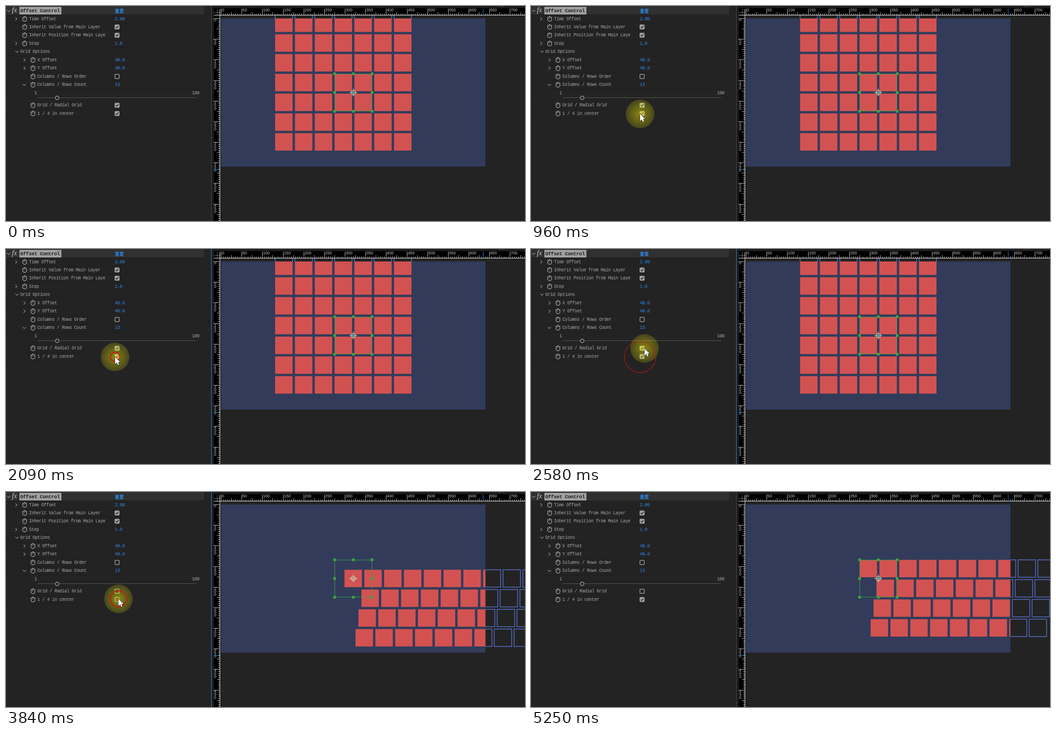
Write an HTML page with a canvas that moves like this. It is 1161 px wide and 482 px high and loops after 5.35 s.

```html
<!DOCTYPE html>
<html lang="en">
<head>
<meta charset="utf-8">
<title>Offset Control</title>
<style>
html, body { margin: 0; width: 100%; height: 100%; overflow: hidden; background: #232323; }
canvas { display: block; }
</style>
</head>
<body>
<canvas id="stage" width="1161" height="482"></canvas>
<script>
const ctx = document.getElementById('stage').getContext('2d');
const LOOP = 5350, UNIT = 0.9235, PITCH = 48 * UNIT, TILE = 39;
const COMP = { x: 481, y: 28, w: 591.5, h: 332 };
const CENTER = { x: 776.7, y: 193.8 };
const MONO = '"Liberation Mono", monospace';
const GRAY = '#a8a8a8', BLUE = '#2d8ceb';

// [time, x, y] of the pointer tip
const POINTER = [
  [640, 170, 515], [800, 212, 345], [930, 244, 242], [2430, 244, 242], [2570, 254, 223],
  [3410, 254, 223], [3480, 251.5, 239.5], [4610, 251.5, 239.5], [4680, 286, 228], [5030, 566, 115]
];
const CLICKS = [[1070, 244, 242], [1880, 244, 242], [2720, 254, 223], [3480, 251.5, 239.5], [4260, 251.5, 239.5]];

function rect(x, y, w, h, color) {
  ctx.fillStyle = color;
  ctx.fillRect(x, y, w, h);
}

function path(points, color, width = 1, closed = false) {
  ctx.beginPath();
  points.forEach(([x, y]) => ctx.lineTo(x, y));
  if (closed) ctx.closePath();
  ctx.strokeStyle = color;
  ctx.lineWidth = width;
  ctx.stroke();
}

function circle(x, y, r, color, width = 1) {
  ctx.beginPath();
  ctx.arc(x, y, r, 0, 7);
  ctx.strokeStyle = color;
  ctx.lineWidth = width;
  ctx.stroke();
}

function text(str, x, y, color = GRAY, font = `10px ${MONO}`, spacing = -0.5) {
  ctx.font = font;
  ctx.letterSpacing = spacing + 'px';
  ctx.fillStyle = color;
  ctx.fillText(str, x, y);
}

function chevron(x, y, open) {
  path(open ? [[x - 3.5, y - 1.5], [x, y + 2], [x + 3.5, y - 1.5]]
            : [[x - 1.5, y - 3.5], [x + 2, y], [x - 1.5, y + 3.5]], '#909090', 1.2);
}

function stopwatch(x, y) {
  circle(x, y + 0.7, 4.6, '#b4b4b4', 1.3);
  path([[x - 2, y - 5.5], [x + 2, y - 5.5]], GRAY, 1.3);
  path([[x, y + 0.7], [x - 2, y - 1.8]], GRAY);
  path([[x - 5, y - 3], [x - 3.5, y - 4.5]], GRAY, 1.2);
  path([[x + 3.5, y - 4.5], [x + 5, y - 3]], GRAY, 1.2);
}

function checkbox(y, on) {
  ctx.beginPath();
  ctx.roundRect(243.7, y - 4.8, 9.6, 9.6, 1.5);
  ctx.strokeStyle = ctx.fillStyle = '#a0a0a0';
  ctx.lineWidth = 1.5;
  ctx.stroke();
  if (!on) return;
  ctx.fill();
  path([[245.5, y], [247.8, y + 2.4], [251.8, y - 2.6]], '#222', 1.6);
}

function row(label, y, level, value, arrow) {
  const x = level * 18.5;
  rect(0, Math.round(y + 9), 443, 1, '#1e1e1e');
  if (arrow) chevron(x + 4, y, arrow === 'open');
  stopwatch(x + 23.3, y);
  text(label, x + 33, y);
  if (typeof value === 'boolean') checkbox(y, value);
  else text(value, 243.5, y, BLUE);
}

function panel(radial, quarter, focused) {
  rect(0, 0, 443, 19, '#303030');
  rect(0, 19, 443, 1, '#1e1e1e');
  chevron(6, 10.5, true);
  text('fx', 13, 10, '#c8c8c8', 'italic 16px "Liberation Serif", serif', 0);
  rect(30, 2, 94, 17, '#a0a0a0');
  text('Offset Control', 32, 11.5, '#1c1c1c', `bold 11px ${MONO}`, -0.3);
  text('重置', 243.5, 11, BLUE, 'bold 10px "Noto Sans CJK SC", sans-serif', 0);
  row('Time Offset', 29, 1, '2.00', 'closed');
  row('Inherit Value from Main Layer', 47, 1, true);
  row('Inherit Position from Main Laye', 65.5, 1, true);
  row('Step', 84, 1, '1.0', 'closed');
  chevron(24.5, 102, true);
  text('Grid Options', 32, 102.5);
  rect(0, 111, 443, 1, '#1e1e1e');
  row('X Offset', 121, 2, '48.0', 'closed');
  row('Y Offset', 139.5, 2, '48.0', 'closed');
  row('Columns / Rows Order', 158, 2, false);
  row('Columns / Rows Count', 176.5, 2, '13', 'open');
  text('1', 63.5, 195.5);
  text('100', 416, 195.5);
  rect(71, 205, 354, 1, '#5c5c5c');
  ctx.beginPath();
  ctx.arc(114.5, 206, 4, 0, 7);
  ctx.fillStyle = '#232323';
  ctx.fill();
  circle(114.5, 206, 4, GRAY, 1.5);
  row('Grid / Radial Grid', 222.5, 2, radial);
  row('1 / 4 in center', 241, 2, quarter);
  rect(459, 0, 1, 482, focused ? BLUE : '#4c4c4c');
  rect(460, 0, 5, 482, '#1c1c1c');
}

function rulers() {
  const font = '9px "Liberation Sans", sans-serif';
  const white = '#c8c8c8';
  rect(465, 0, 696, 5, '#1c1c1c');
  rect(465, 5, 696, 16, '#000');
  rect(465, 5, 14, 477, '#000');
  rect(1101, 0, 14, 1, '#4a4a18');
  for (let n = 0; n < 740; n += 5) {
    const p = n * UNIT, major = n % 50 === 0;
    const size = major ? 14 : n % 25 === 0 ? 6 : 3;
    const x = Math.round(COMP.x + p), y = Math.round(COMP.y + p);
    rect(x, 20 - size, 1, size, white);
    if (y < 482) rect(478 - size, y, size, 1, white);
    if (!major) continue;
    text(n, x + 2, 9.5, white, font, 0);
    [...String(n)].forEach((digit, i) => text(digit, 465.5, y + 4 + i * 7, white, font, 0));
  }
  rect(465, 20, 696, 1, '#fff');
  rect(478, 7, 1, 475, '#fff');
  for (let i = 0; i < 13; i += 2) {
    rect(465 + i, 14, 1, 1, white);
    rect(472, 7 + i, 1, 1, white);
  }
  rect(1067, 6, 1, 14, BLUE);
  rect(465, 366, 13, 1, BLUE);
}

function tiles(radial, quarter) {
  const shift = (quarter ? -PITCH / 2 : 0) - TILE / 2;
  const list = [];
  for (let r = 0; r < (radial ? 7 : 4); r++) {
    const count = radial ? 7 : r < 3 ? 13 : 9;
    const start = radial ? -3 * PITCH : r && 44.4 - 6.55 * r;
    for (let c = 0; c < count; c++) {
      list.push([CENTER.x + shift + start + c * PITCH,
                 CENTER.y + shift + (radial ? r - 3 : r) * PITCH]);
    }
  }
  return list;
}

function clipTo(x, y, w, h) {
  ctx.beginPath();
  ctx.rect(x, y, w, h);
  ctx.clip();
}

function viewport(radial, quarter) {
  const list = tiles(radial, quarter);
  ctx.save();
  clipTo(479, 21, 682, 461);
  ctx.strokeStyle = '#5068b8';
  ctx.lineWidth = 1.8;
  for (const [x, y] of list) ctx.strokeRect(x, y, TILE, TILE);
  rect(COMP.x, COMP.y, COMP.w, COMP.h, '#323c5a');
  clipTo(COMP.x, COMP.y, COMP.w, COMP.h);
  for (const [x, y] of list) rect(x, y, TILE, TILE, '#d25252');
  ctx.restore();
  selection();
}

function selection() {
  const x = 777, y = 194, half = 42, green = '#3fa145', pale = '#c4e6c0';
  ctx.strokeStyle = green;
  ctx.lineWidth = 1;
  ctx.strokeRect(735.5, 152.5, 83, 83);
  for (const i of [-1, 0, 1]) for (const j of [-1, 0, 1]) {
    if (i || j) rect(x + i * half - 3, y + j * half - 3, 6, 6, green);
  }
  circle(x, y, 5, pale, 1.2);
  circle(x, y, 2, pale, 1.2);
  for (const [dx, dy] of [[1, 0], [-1, 0], [0, 1], [0, -1]]) {
    path([[x + dx * 3, y + dy * 3], [x + dx * 8.5, y + dy * 8.5]], pale, 1.2);
  }
}

function ring(t, [start, x, y]) {
  const r = (t - start) * 0.05;
  if (r <= 0 || r > 38) return;
  ctx.globalAlpha = Math.min(1, (41 - r) / 11);
  circle(x, y, r, '#c41a10', 2.2);
  ctx.globalAlpha = 1;
}

function pointer(t) {
  const i = POINTER.findIndex(([time]) => time > t);
  if (i < 1) return;
  const [t0, x0, y0] = POINTER[i - 1], [t1, x1, y1] = POINTER[i];
  const k = (t - t0) / (t1 - t0);
  const x = x0 + (x1 - x0) * k, y = y0 + (y1 - y0) * k;
  const glow = ctx.createRadialGradient(x, y, 0, x, y, 32);
  glow.addColorStop(0, 'rgba(255,248,0,.47)');
  glow.addColorStop(1, 'rgba(255,248,0,.16)');
  ctx.fillStyle = glow;
  ctx.beginPath();
  ctx.arc(x, y, 32, 0, 7);
  ctx.fill();
  CLICKS.forEach(click => ring(t, click));
  const shape = [[0, 0], [0, 16], [3.8, 12.6], [6.4, 18], [9, 16.8], [6.5, 11.6], [11.5, 11.4]];
  path(shape.map(([dx, dy]) => [x + dx, y + dy]), '#111', 1.2, true);
  ctx.fillStyle = '#fff';
  ctx.fill();
}

function draw() {
  const t = performance.now() % LOOP;
  // The loop opens with both grid options on.
  const radial = t < 3000;
  const quarter = t < 1390 || (t >= 2090 && t < 3700) || t >= 4400;
  const focused = t >= CLICKS[0][0] && t < 5250;
  ctx.textBaseline = 'middle';
  rect(0, 0, 1161, 482, '#232323');
  panel(radial, quarter, focused);
  rulers();
  viewport(radial, quarter);
  if (t < 5030) pointer(t);
  else CLICKS.forEach(click => ring(t, click));
  requestAnimationFrame(draw);
}
draw();
</script>
</body>
</html>
```
